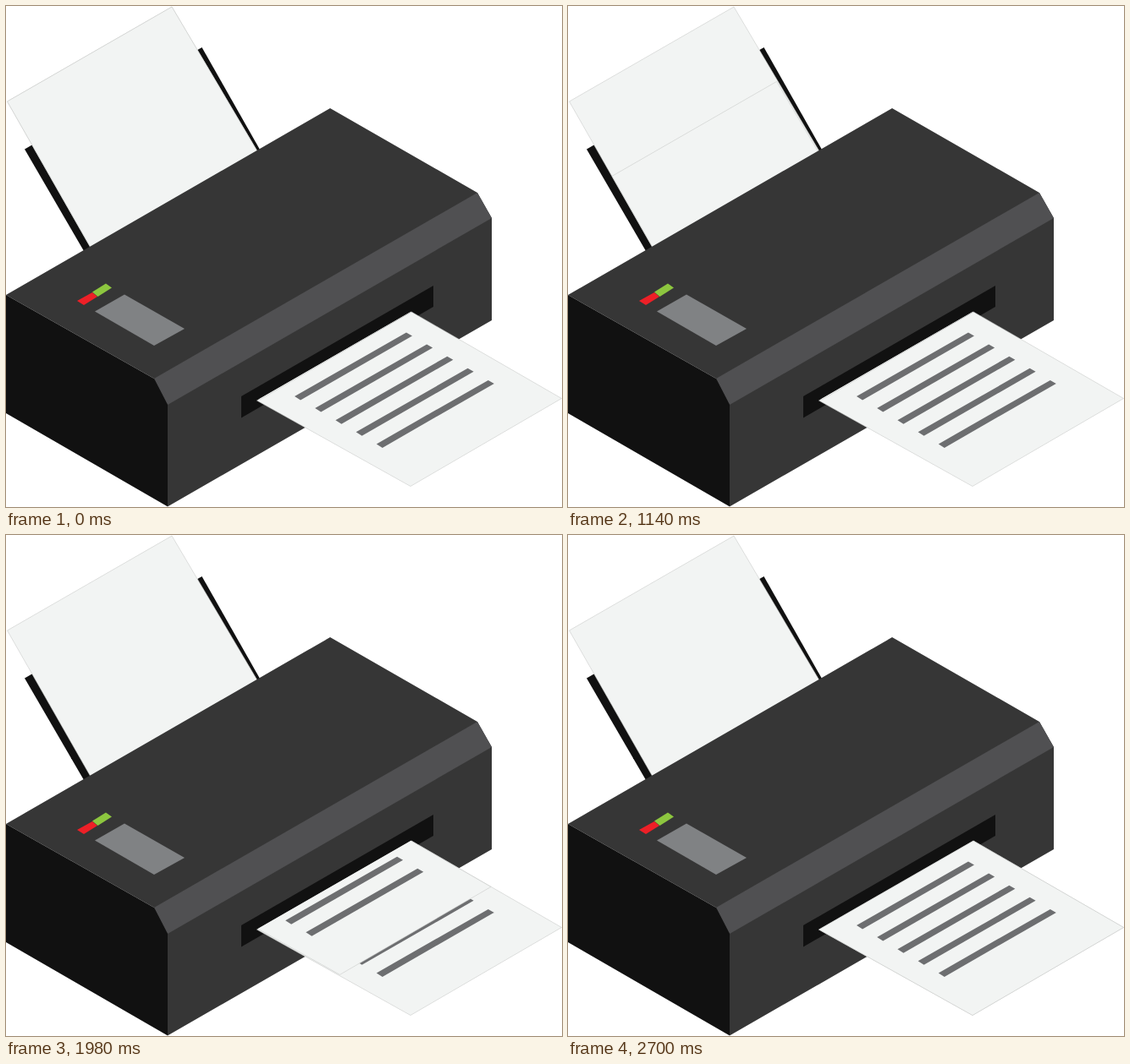
Animation, 657 px wide and 593 px high, one loop 2.73 s. Source, as an HTML page:

```html
<!DOCTYPE html>
<html lang="en">
<head>
<meta charset="utf-8">
<title>Printer</title>
<style>
  html, body { margin: 0; width: 100%; height: 100%; overflow: hidden; background: #fff; }
  svg { display: block; width: 100%; height: 100%; }
  .sheet { fill: #f2f4f3; stroke: #c9cbca; stroke-width: .6; }
  .dark { fill: #363636; }
  .black { fill: #111; }
</style>
</head>
<body>
<svg viewBox="0 0 657 593">
  <defs>
    <clipPath id="exit"><path d="M296 467L479 361.5L657 361V593H296Z"/></clipPath>
    <path id="blank" class="sheet" d="M1.5 113L196 1L297 172L100 286Z"/>
    <g id="page">
      <path class="sheet" d="M296.5 467L479 362L656.5 464.5L478 568.5Z"/>
      <path id="line" fill="#6d6e70" d="M341 462L473 386.5L480 390.5L348 466.5Z"/>
      <use href="#line" x="24.2" y="14.1"/>
      <use href="#line" x="48.4" y="28.2"/>
      <use href="#line" x="72.6" y="42.3"/>
      <use href="#line" x="96.8" y="56.4"/>
    </g>
  </defs>

  <path class="black" d="M22 169.5L231.500 49L300 170L92 290Z"/>
  <use href="#blank"/>
  <use href="#blank" id="feed"/>

  <path class="dark" d="M0 342L383 121L557 221L574 251V372L191 592.500L175 441Z"/>
  <path fill="#505052" d="M175 441L557 221L574 251L191 472Z"/>
  <path class="black" d="M0 342L175 441L191 472V592.500L0 482Z"/>
  <path class="black" d="M278 462L505 331V356L278 487.500Z"/>
  <path fill="#ed2027" d="M84 349L102 339L108 344L92 354Z"/>
  <path fill="#8dc63f" d="M102 338.500L118 328.500L125 333.500L108.500 344Z"/>
  <path fill="#808284" d="M105 361.500L140 341.500L211 382L175 402Z"/>

  <use href="#page"/>
  <g clip-path="url(#exit)"><use href="#page" id="print"/></g>
</svg>
<script>
  const LOOP = 2730;
  const feed = document.getElementById('feed');
  const print = document.getElementById('print');

  // Smooth 0..1 progress between two times
  const ease = (t, start, end) => {
    const u = Math.min(1, Math.max(0, (t - start) / (end - start)));
    return u * u * (3 - 2 * u);
  };
  const move = (el, x, y, k) => el.setAttribute('transform', `translate(${x * k} ${y * k})`);

  function draw() {
    const t = performance.now() % LOOP;
    // The sheet is picked up, pauses, then feeds through
    move(feed, 99, 173, 0.147 * ease(t, 0, 300) + 0.853 * ease(t, 600, 1800));
    move(print, -178, -102.5, 1 - ease(t, 1200, 2700));
    requestAnimationFrame(draw);
  }
  draw();
</script>
</body>
</html>
```
